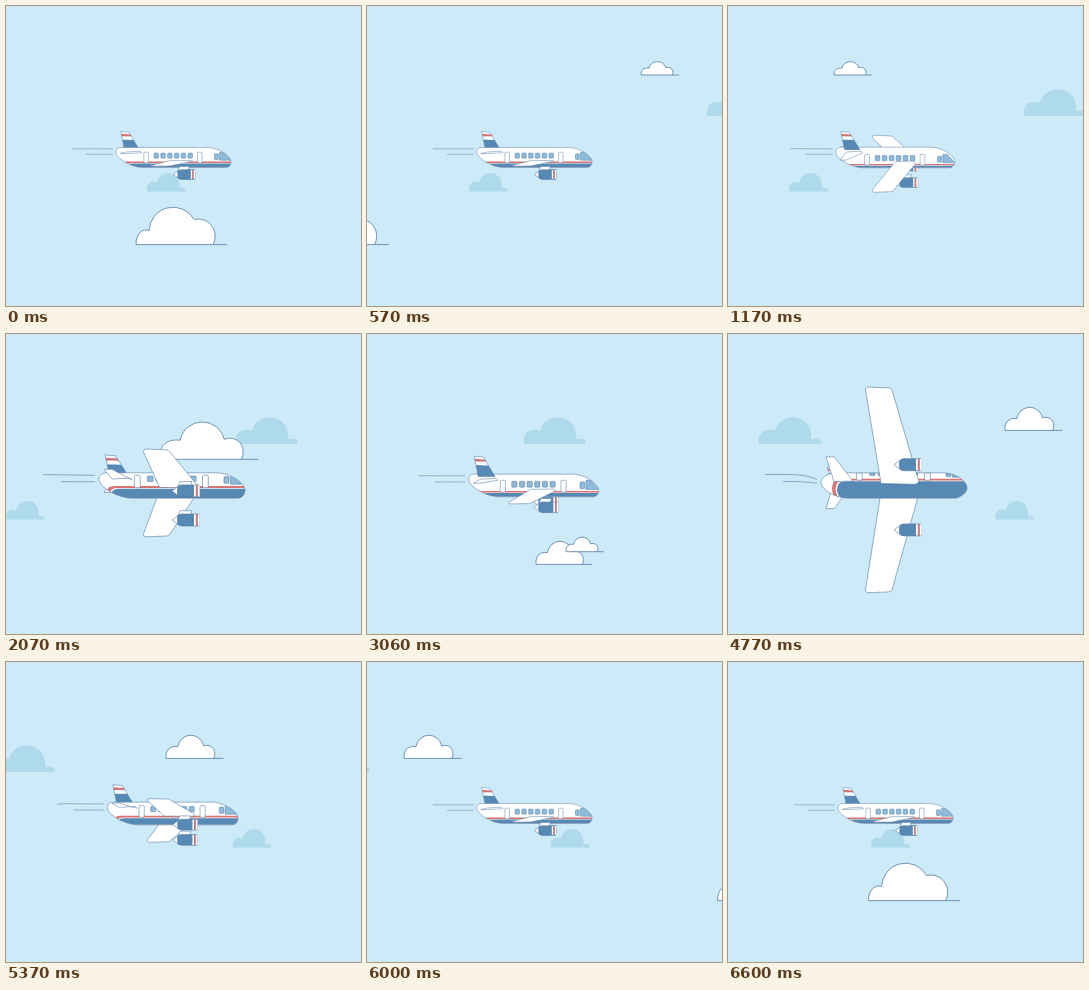
An HTML page with a canvas for the animation above (6.63 s loop, 355x300 px).

```html
<!DOCTYPE html>
<html lang="en">
<head>
<meta charset="utf-8">
<title>Plane</title>
<style>
html, body { margin: 0; width: 100%; height: 100%; overflow: hidden; background: #cdeaf8; }
canvas { display: block; }
</style>
</head>
<body>
<canvas id="stage" width="355" height="300"></canvas>
<script>
const g = document.getElementById('stage').getContext('2d');
const LOOP = 6630, R = 12.7;
const SKY = '#cdeaf8', PALE = '#aedaeb', BLUE = '#5689b3', GLASS = '#8dbbd8',
      RED = '#d8736f', WHITE = '#fff', LINE = '#557ba6';
const {sin, cos, PI, min, max} = Math;
const rad = d => d * PI / 180;

// Keys are [ms, value], joined by sine easing.
const ROLL = [[0, 0], [700, 0], [1380, 19], [2150, -23], [3020, 4.5], [3700, 0],
              [4590, 0], [5300, -373], [5950, -360], [LOOP, -360]];
const ZOOM = [[0, .788], [900, .788], [2100, 1], [3400, .87], [4700, 1], [4800, 1],
              [5950, .788], [LOOP, .788]];

function at(keys, t) {
  if (t <= 0) return keys[0][1];
  const i = keys.findIndex(k => k[0] >= t);
  const [t0, a] = keys[i - 1], [t1, b] = keys[i];
  return a + (b - a) * (1 - cos(PI * (t - t0) / (t1 - t0))) / 2;
}

function paint(path, fill, stroke) {
  if (fill) { g.fillStyle = fill; g.fill(path); }
  if (stroke) { g.strokeStyle = stroke; g.stroke(path); }
}

function poly(points, fill, stroke) {
  const p = new Path2D();
  points.forEach(([x, y]) => p.lineTo(x, y));
  p.closePath();
  paint(p, fill, stroke);
}

// Clouds
const paleCloud = new Path2D(
  'M0 0V-4C0-12 8-17 16-13A18.5 18.5 0 0 1 52-4.5Q62-8 62 0Z');
const wideCloud = new Path2D(
  'M0 0C-2-13 7-21 20-19A22.5 22.5 0 0 1 64-20C75-24 83-16 83-8Q83-3 81 0ZM81 0H98');
const tallCloud = new Path2D(
  'M0 0C-1-10 7-17 13-14A24 24 0 0 1 58-25C70-28 79-18 79-9Q79-4 77 0ZM77 0H91');

// [shape, x, time at x, speed in px/s, base y, scale x, scale y]
const CLOUDS = [
  [paleCloud, 296, 1170, 73.6, 110, 1, 1],
  [paleCloud, 141, 0, 68, 185.5, .625, .69],
  [wideCloud, 106.5, 1170, 280, 69, .384, .36],
  [wideCloud, 154.5, 2070, 350, 125.3, 1, 1],
  [wideCloud, 169.3, 3060, 240, 230.4, .57, .62],
  [wideCloud, 199.3, 3060, 280, 217.7, .384, .39],
  [wideCloud, 277.3, 4770, 195, 96.4, .586, .62],
  [tallCloud, 130.5, LOOP, 350, 238.6, 1, 1]
];

function drawCloud([shape, x0, t0, speed, y, sx, sy], t) {
  const pale = shape === paleCloud;
  for (const turn of [-LOOP, 0, LOOP]) {
    const x = x0 - (t + turn - t0) * speed / 1000;
    if (x < -110 || x > 360) continue;
    const p = new Path2D();
    p.addPath(shape, new DOMMatrix([sx, 0, 0, sy, x, y]));
    g.lineWidth = .8;
    paint(p, pale ? PALE : WHITE, pale ? null : LINE);
  }
}

// Plane: x runs along the fuselage, the roll turns everything around it.
function drawPlane(t) {
  const roll = at(ROLL, t), k = at(ZOOM, t);
  const s = sin(rad(roll)), c = cos(rad(roll));

  // Visible y range of a strip on the hull around angle a
  function span(a, half) {
    const m = ((a + roll + 180) % 360 + 360) % 360 - 180;
    const lo = max(-90, m - half), hi = min(90, m + half);
    return lo < hi ? [R * sin(rad(lo)), R * sin(rad(hi))] : null;
  }

  function trail(x0, h) {
    const p = new Path2D();
    for (let x = -77; x >= x0; x -= 2) {
      p.lineTo(x, -h * cos(rad(at(ROLL, t - (-77 - x) * k / .22))));
    }
    paint(p, null, LINE);
  }

  function engine(side) {
    const y = 21.5 * c + 39 * s * side;
    poly([[4, y], [17, y], [20, y - 10 * c], [8, y - 10 * c]], WHITE, LINE);
    poly([[0, y], [6, y - 4.5], [6, y + 4.5]], WHITE, LINE);
    const p = new Path2D();
    p.roundRect(5.5, y - 6, 22, 12, [4, 1, 1, 4]);
    paint(p, BLUE, LINE);
    [WHITE, RED, WHITE].forEach((col, i) => {
      g.fillStyle = col;
      g.fillRect(22 + i * 1.9, y - 5.7, 1.9, 11.4);
    });
  }

  function wing(side) {
    const tip = (side > 0 ? 11 : 5) * c + 125 * s * side;
    const root = 4 * c + 5 * s * side, back = max(-13, -5 + 20 * s);
    const d = max(-3, min(3, (tip - root) * .1));
    const p = new Path2D();
    p.moveTo(back, root);
    p.lineTo(-28.5, tip - d);
    p.quadraticCurveTo(-29, tip, -25, tip);
    p.lineTo(-6, tip - d / 4);
    p.quadraticCurveTo(-3, tip - d / 4, -2, tip - d);
    p.lineTo(24.5, root + d);
    p.quadraticCurveTo(25, root, 21, root - d / 4);
    p.closePath();
    paint(p, WHITE, LINE);
  }

  function tailplane(side) {
    const tip = -5 * c + 31 * s * side;
    poly([[-60, -7 * c], [-68, tip], [-60, tip], [-40, -6 * c], [-42, -8 * c]], WHITE, LINE);
  }

  function wingSet(side) {
    tailplane(side);
    const parts = [wing, engine];
    if (s * c > 0 || Math.abs(s) < .02) parts.reverse();
    parts.forEach(part => part(side));
  }

  function fin() {
    const strip = (h0, h1, fill, stroke) => {
      const l = h => -62.5 - (h - 11) * .2, r = h => -44 - (h - 11) * .57;
      poly([[l(h0), -h0 * c], [l(h1), -h1 * c], [r(h1), -h1 * c * .97], [r(h0), -h0 * c]],
        fill, stroke);
    };
    strip(10, 23, BLUE);
    strip(23, 27, WHITE);
    strip(27, 30, RED);
    strip(30, 33, WHITE);
    strip(10, 33, null, LINE);
  }

  function hull() {
    const tail = -6.5 * c, nose = 5 * c;
    const topTail = -52 - 14 * c, lowTail = -52 + 14 * c;
    const topNose = 54.5 - 11.5 * c, lowNose = 54.5 + 11.5 * c;
    const body = new Path2D(`M-73 ${tail}C-73 ${tail - 5} ${topTail - 4} ${-R} ${topTail} ${-R}` +
      `H${topNose}C${topNose + 14} ${-R} 73 ${nose - 7} 73 ${nose}` +
      `C73 ${nose + 5} ${lowNose + 4} ${R} ${lowNose} ${R}H${lowTail}` +
      `C${lowTail - 16} ${R} -73 ${tail + 7} -73 ${tail}Z`);
    paint(body, WHITE);
    g.save();
    g.clip(body);

    // Red and white piping around the blue belly
    [[RED, 66, -62], [WHITE, 56.5, -58.5], [BLUE, 53, -57]].forEach(([col, half, end]) => {
      const ys = span(90, half);
      if (!ys) return;
      const [a, b] = ys, m = (a + b) / 2, x = end + 5 - 9 * c;
      paint(new Path2D(`M75 ${a}H${x + 8}Q${x} ${a} ${x} ${m}Q${x} ${b} ${x + 8} ${b}H75Z`), col);
    });

    for (const flip of [false, true]) {
      const strip = (a, half) => span(flip ? 180 - a : a, half);
      const panel = (x, w, a, half, fill) => {
        const ys = strip(a, half);
        if (!ys) return;
        const p = new Path2D();
        p.roundRect(x, ys[0], w, ys[1] - ys[0], 1);
        paint(p, fill, LINE);
      };
      panel(-37.6, 5.8, 0, 32, WHITE);
      panel(30.5, 5.8, 0, 32, WHITE);
      for (let i = 0; i < 6; i++) panel(-24.7 + i * 8.6, 5.8, -11, 15, GLASS);
      panel(52, 5, -5, 17, GLASS);
      const ys = strip(-8, 24);
      if (ys) {
        const [up, down] = flip ? [ys[1], ys[0]] : ys;
        poly([[58.5, up], [64, up], [73, down], [58.5, down]], GLASS, LINE);
      }
    }
    g.restore();
    paint(body, null, LINE);
  }

  g.save();
  g.translate(173 - 7 * k, 151.5);
  g.scale(k, k);
  g.lineWidth = .6;
  g.lineJoin = 'round';
  trail(-130, 11);
  trail(-112, 4);
  const near = c >= 0 ? 1 : -1;
  if (s <= .02) fin();
  wingSet(-near);
  hull();
  if (s > .02) fin();
  wingSet(near);
  g.restore();
}

function frame(now) {
  const t = now % LOOP;
  g.fillStyle = SKY;
  g.fillRect(0, 0, 355, 300);
  CLOUDS.forEach(cloud => drawCloud(cloud, t));
  drawPlane(t);
  requestAnimationFrame(() => frame(performance.now() - start));
}
const start = performance.now();
frame(0);
</script>
</body>
</html>
```
